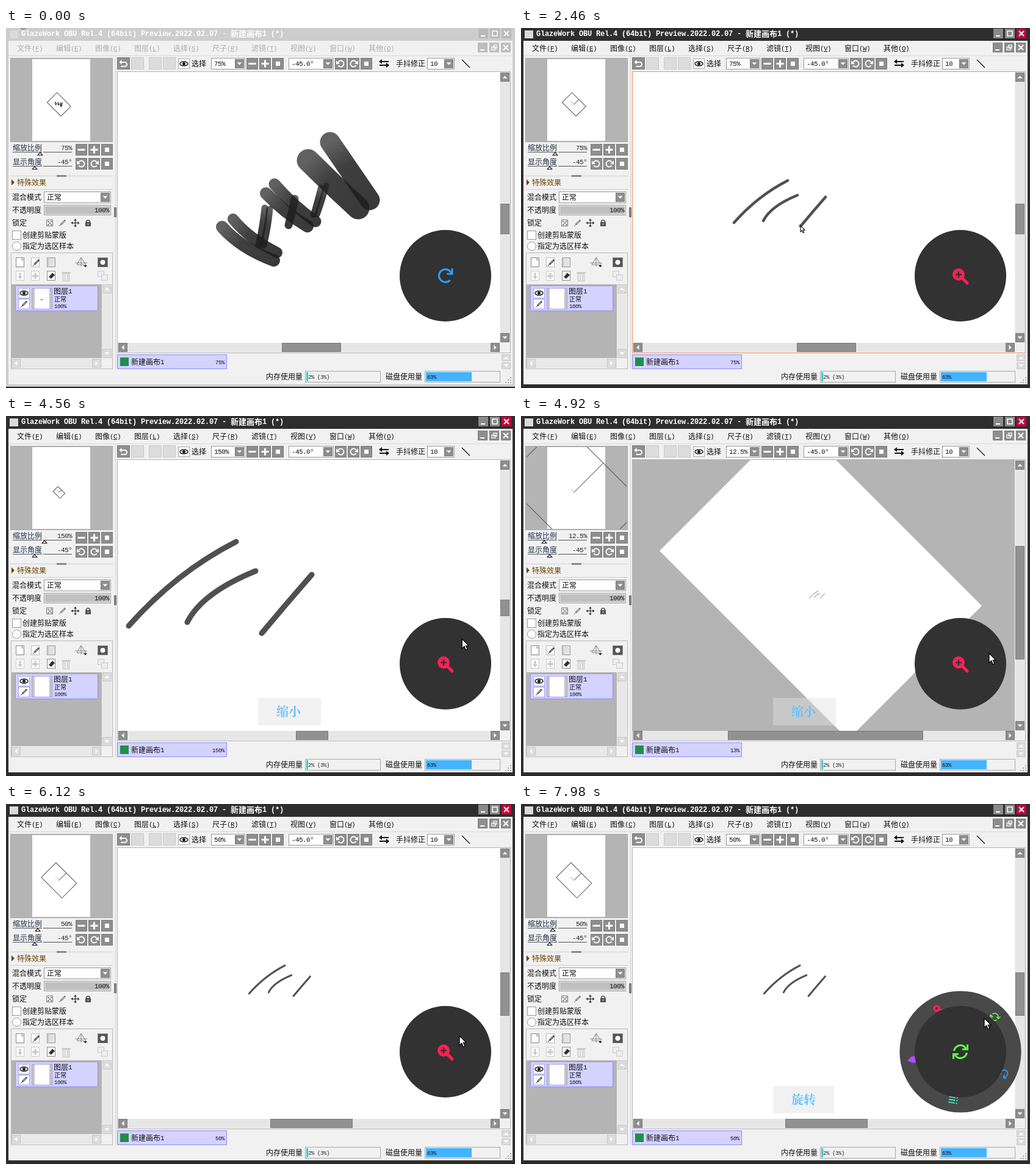
An HTML page with a canvas that plays this animation: 834 by 590 pixels, repeating every 8 s.

```html
<!DOCTYPE html>
<html lang="zh">
<head>
<meta charset="utf-8">
<title>Radial dial demo</title>
<style>
html, body { margin: 0; width: 100%; height: 100%; overflow: hidden; background: #f0f0f0; }
canvas { display: block; width: 834px; height: 590px; }
</style>
</head>
<body>
<canvas id="stage" width="834" height="590"></canvas>
<script>
const g = document.getElementById('stage').getContext('2d');
const LOOP = 8000, RAD = Math.PI / 180;
const VIEW = { x: 497, y: 294, w: 626, h: 444 };
const DIAL = { x: 720, y: 406, r: 75 };
const PINK = '#ff2056', GREEN = '#62ff4d', BLUE = '#2ba0ff';

// Strokes: start, control, end, width (coordinates at 75 % zoom)
const BOLD = [
  [354, 326, 385, 361, 439, 381, 20], [372, 313, 398, 345, 444, 368, 18],
  [424, 295, 421, 325, 414, 356, 11], [432, 297, 429, 328, 422, 356, 11],
  [473, 280, 469, 302, 463, 323, 13],
  [426, 271, 458, 304, 494, 325, 20], [440, 256, 470, 291, 507, 317, 19],
  [516, 262, 510, 285, 504, 306, 10], [525, 258, 518, 284, 510, 306, 9],
  [495, 217, 535, 257, 577, 295, 37], [531, 187, 563, 234, 596, 282, 33]
];
const FINE = [
  [437, 250, 388, 275, 349, 319, 4.5],
  [453, 274, 409, 292, 397, 316, 4.5],
  [499, 277, 478, 301, 458, 325, 4.5]
];
const FINE_TIME = [[1440, 1800], [1920, 2160], [2260, 2450]];
const ZOOM = [[0, 75], [3780, 100], [3960, 150], [4140, 200], [4560, 150], [4620, 100],
  [4680, 75], [4740, 50], [4800, 33.3], [4860, 25], [4920, 12.5],
  [5400, 16.7], [5520, 25], [5600, 33.3], [5690, 50]];
const MOUSE = [[1020, 748, 372], [1400, 437, 249], [1440, 437, 249], [1800, 349, 318],
  [1920, 453, 273], [2160, 397, 315], [2260, 499, 276], [2450, 458, 324], [2600, 458, 324],
  [3000, 746, 364], [4500, 746, 364], [4920, 767, 389], [5340, 743, 384], [5900, 743, 384],
  [6120, 743, 380], [6400, 743, 380], [6780, 762, 400], [7140, 762, 400], [7320, 761, 375],
  [7500, 761, 375], [7680, 759, 351]];
const TOASTS = [[3660, 4560, '放大'], [4560, 5400, '缩小'], [5400, 6110, '放大'], [7860, 8000, '旋转']];

const ramp = (t, a, b) => Math.min(1, Math.max(0, (t - a) / (b - a)));
const ease = p => p * p * (3 - 2 * p);
const mix = (a, b, p) => a + (b - a) * p;

function rect(x, y, w, h, c) { g.fillStyle = c; g.fillRect(x, y, w, h); }
function box(x, y, w, h, fill, edge) {
  rect(x, y, w, h, edge);
  rect(x + 1, y + 1, w - 2, h - 2, fill);
}
function line(c, w, ...p) {
  g.strokeStyle = c; g.lineWidth = w;
  g.beginPath();
  for (let i = 0; i < p.length; i += 2) g.lineTo(p[i], p[i + 1]);
  g.stroke();
}
function poly(c, ...p) {
  g.fillStyle = c;
  g.beginPath();
  for (let i = 0; i < p.length; i += 2) g.lineTo(p[i], p[i + 1]);
  g.closePath();
  g.fill();
}
function disc(x, y, r, c) { g.fillStyle = c; g.beginPath(); g.arc(x, y, r, 0, 7); g.fill(); }
function arc(x, y, r, a, b, c, w) {
  g.strokeStyle = c; g.lineWidth = w;
  g.beginPath(); g.arc(x, y, r, a * RAD, b * RAD); g.stroke();
}
function at(x, y, draw) { g.save(); g.translate(x, y); draw(); g.restore(); }

// Mixed text: CJK and Latin runs have their own size; y is the middle
const STYLES = {
  ui: [12, 11, '-0.6px', ''],
  small: [10, 9, '-0.4px', ''],
  title: [13, 12, '-0.2px', 'bold ']
};
function text(s, x, y, c = '#111', style = 'ui', right = false) {
  const [cjk, latin, gap, weight] = STYLES[style];
  const runs = (s.match(/[\u2e80-\uffff]+|[^\u2e80-\uffff]+/g) || []).map(r => ({
    r, wide: r.charCodeAt(0) > 0x2e7f
  }));
  const set = wide => {
    g.font = weight + (wide ? cjk + 'px "Noto Sans CJK SC","Noto Sans CJK",sans-serif'
      : latin + 'px "Liberation Mono",monospace');
    g.letterSpacing = wide ? '0px' : gap;
  };
  for (const o of runs) { set(o.wide); o.w = g.measureText(o.r).width; }
  if (right) x -= runs.reduce((a, o) => a + o.w, 0);
  g.fillStyle = c;
  for (const o of runs) { set(o.wide); g.fillText(o.r, x, y + (o.wide ? 4.5 : 3.5)); x += o.w; }
  g.letterSpacing = '0px';
}

function spin(flip) {
  g.scale(flip, 1);
  arc(0, 0, 5, -150, 145, '#fff', 1.8);
  poly('#fff', -7.5, -5, -7.5, 1, -1.5, 0);
}
function hook(flip) {
  g.scale(flip, 1);
  line('#fff', 2, -4, -2, 2, -2);
  arc(2, 1.5, 3.5, -90, 90, '#fff', 2);
  line('#fff', 2, 2, 5, -4, 5);
  poly('#fff', -7, -2, -3, -6, -3, 2);
}
const GLYPHS = {
  min: () => rect(-4, 3, 7, 2, '#fff'),
  max: () => { g.strokeStyle = '#fff'; g.lineWidth = 1.5; g.strokeRect(-4, -4, 8, 8); },
  rest: () => { g.strokeStyle = '#fff'; g.lineWidth = 1.2; g.strokeRect(-4, -1, 6, 5); g.strokeRect(-1, -4, 5, 5); },
  shut: () => { line('#fff', 2, -4, -4, 4, 4); line('#fff', 2, -4, 4, 4, -4); },
  minus: () => rect(-6, -1.5, 12, 3, '#fff'),
  plus: () => { rect(-6, -1.5, 12, 3, '#fff'); rect(-1.5, -6, 3, 12, '#fff'); },
  stop: () => rect(-3.5, -3.5, 7, 7, '#fff'),
  ccw: () => spin(1), cw: () => spin(-1),
  undo: () => hook(1), redo: () => hook(-1),
  down: () => poly('#fff', -4, -2, 4, -2, 0, 2),
  up: () => poly('#fff', -4, 2, 4, 2, 0, -2),
  left: () => poly('#fff', 2, -4, 2, 4, -2, 0),
  right: () => poly('#fff', -2, -4, -2, 4, 2, 0),
  none: () => {}
};
function button(x, y, w, glyph, on = true, h = w, fill = '#8e8e8e') {
  box(x, y, w, h, on ? fill : '#dcdcdc', on ? fill === '#8e8e8e' ? '#7b7b7b' : fill : '#c8c8c8');
  at(x + w / 2, y + h / 2, GLYPHS[glyph]);
}
function combo(x, y, w, h, s) {
  box(x, y, w, h, '#fff', '#9a9a9a');
  text(s, x + 5, y + h / 2);
  button(x + w - 17, y + 2, 15, 'down', true, h - 4);
}
function eye(x, y) {
  g.strokeStyle = '#222'; g.lineWidth = 1.5;
  g.beginPath(); g.ellipse(x, y, 6.5, 3.5, 0, 0, 7); g.stroke();
  disc(x, y, 2.6, '#222');
}
function pen(x, y, c = '#333') {
  line(c, 2.6, x - 3, y + 3, x + 4, y - 4);
  line('#fff', 1, x - 2, y + 2, x + 3, y - 3);
  line(c, 1, x - 6, y + 6, x - 3, y + 3);
}

function windowFrame(s) {
  rect(0, 0, 834, 590, '#262626');
  rect(0, 0, 834, 588, s.active ? '#2e2e2e' : '#cdcdcd');
  rect(4, 21, 826, 563, '#f1f1f1');
  rect(6, 4, 14, 13, '#dadada');
  text('GlazeWork OBU Rel.4 (64bit) Preview.2022.02.07 - 新建画布1' + (s.dirty ? ' (*)' : ''),
    25, 9, '#fff', 'title');
  const cap = s.active ? '#8a8a8a' : '#bababa';
  button(774, 1, 16, 'min', true, 16, cap);
  button(793, 1, 16, 'max', true, 16, cap);
  button(812, 1, 16, 'shut', true, 16, s.active ? '#c8003c' : '#bababa');
  ['min', 'rest', 'shut'].forEach((k, i) => button(773 + i * 19, 24, 16, k, true, 16, s.active ? '#8e8e8e' : '#bebebe'));
  const ink = s.active ? '#111' : '#adadad';
  '文件F 编辑E 图像C 图层L 选择S 尺子R 滤镜T 视图V 窗口W 其他O'.split(' ').forEach((m, i) => {
    const x = 18 + i * 64;
    text(`${m.slice(0, 2)}(${m[2]})`, x, 33, ink);
    rect(x + 30, 38, 6, 1, ink);
  });
  rect(4, 45, 826, 1, '#d8d8d8');
}

function toolbar(s) {
  button(182, 48, 21, s.dirty ? 'undo' : 'none', s.dirty, 20);
  button(205, 48, 21, s.redo ? 'redo' : 'none', s.redo, 20);
  button(234, 48, 21, 'none', false, 20);
  button(257, 48, 21, 'none', false, 20);
  box(282, 50, 19, 17, '#fff', '#aaa');
  eye(291.5, 58.5);
  text('选择', 304, 58);
  combo(336, 49, 56, 19, s.zoom + '%');
  ['minus', 'plus', 'stop'].forEach((k, i) => button(394 + i * 21, 49, 19, k));
  combo(463, 49, 74, 19, '-45.0°');
  ['ccw', 'cw', 'stop'].forEach((k, i) => button(539 + i * 21, 49, 19, k));
  rect(615, 54, 12, 2, '#111'); poly('#111', 611, 55, 616, 51, 616, 59);
  rect(612, 60, 12, 2, '#111'); poly('#111', 628, 61, 623, 57, 623, 65);
  text('手抖修正', 639, 58);
  combo(690, 49, 45, 19, '10');
  line('#111', 1.2, 747, 52, 760, 65);
}

function quad([x0, y0, cx, cy, x1, y1, w], p, ink) {
  const ax = mix(x0, cx, p), ay = mix(y0, cy, p);
  g.strokeStyle = ink; g.lineWidth = w;
  g.beginPath();
  g.moveTo(x0, y0);
  g.quadraticCurveTo(ax, ay, mix(ax, mix(cx, x1, p), p), mix(ay, mix(cy, y1, p), p));
  g.stroke();
}
function strokes(s) {
  g.lineCap = 'round';
  BOLD.slice(0, s.bold).forEach(b => {
    const ink = g.createLinearGradient(b[0], b[1], b[4], b[5]);
    ink.addColorStop(0, 'rgba(30,30,30,.7)');
    ink.addColorStop(.4, 'rgba(30,30,30,.85)');
    ink.addColorStop(1, 'rgba(30,30,30,.88)');
    quad(b, 1, ink);
  });
  FINE.forEach((f, i) => s.fine[i] > 0 && quad(f, s.fine[i], '#505050'));
  g.lineCap = 'butt';
}

function clipTo(x, y, w, h) { g.beginPath(); g.rect(x, y, w, h); g.clip(); }

function canvasArea(s) {
  const k = s.zoom / 12.5;
  box(182, 71, 645, 462, '#f1f1f1', s.focus ? '#ff8a5c' : '#b4b4b4');
  g.save();
  clipTo(183, 72, 626, 444);
  rect(183, 72, 626, 444, '#b4b4b4');
  g.translate(VIEW.x, VIEW.y);
  g.save();
  g.scale(k, k);
  poly('#fff', -270, -73, -51, -292, 258, 17, 39, 236);
  g.restore();
  g.scale(k / 6, k / 6);
  g.translate(-VIEW.x, -VIEW.y);
  strokes(s);
  g.restore();

  const bar = (track, view, mid, off) => {
    const total = view + 528 * k, size = track * view / total;
    return [Math.round(mid + off * k / total * track - size / 2), Math.round(size)];
  };
  rect(810, 73, 16, 443, '#e6e6e6');
  rect(184, 516, 625, 15, '#e6e6e6');
  button(810, 73, 15, 'up'); button(810, 500, 15, 'down');
  button(184, 516, 15, 'left'); button(794, 516, 15, 'right');
  const [vy, vh] = bar(408, VIEW.h, 294, 28), [hx, hw] = bar(590, VIEW.w, 495.5, 6);
  box(810, vy, 15, vh, '#919191', '#7b7b7b');
  box(hx, 516, hw, 15, '#919191', '#7b7b7b');
}

function inThumb(s) {
  g.translate(86.8, 125.2);
  g.rotate(45 * RAD);
  g.scale(.051, .051);
  g.translate(-VIEW.x, -VIEW.y);
  strokes(s);
}
function navigator(s) {
  box(7, 49, 168, 138, '#b4b4b4', '#a8a8a8');
  g.save();
  clipTo(9, 51, 164, 134);
  rect(43, 51, 95, 134, '#fff');
  g.save(); inThumb(s); g.restore();
  const k = .306 * 12.5 / s.zoom, w = VIEW.w * k, h = VIEW.h * k;
  g.translate(86.8, 125.2);
  g.rotate(45 * RAD);
  g.strokeStyle = '#555'; g.lineWidth = 1;
  g.strokeRect(-w / 2, -h / 2, w, h);
  if (!s.bold) line('#666', 1, 0, 0, 0, -h / 2);
  g.restore();

  const slider = (y, label, value, x) => {
    text(label, 11, y, '#1c2c44', 'ui');
    text(value, 108, y, '#222', 'ui', true);
    rect(11, y + 7, 97, 1, '#555');
    rect(59, y + 7, 2, 1, '#f1f1f1');
    poly('#222', x - 5, y + 13, x, y + 7, x + 5, y + 13);
    poly('#fff', x - 2.5, y + 12, x, y + 9, x + 2.5, y + 12);
  };
  slider(196, '缩放比例', s.zoom + '%', Math.round(59 + 7 * Math.log2(s.zoom / 100)));
  slider(219, '显示角度', '-45°', 47);
  ['minus', 'plus', 'stop'].forEach((k2, i) => button(114 + i * 21, 190, 19, k2));
  ['ccw', 'cw', 'stop'].forEach((k2, i) => button(114 + i * 21, 213, 19, k2));
}

function properties() {
  rect(7, 242, 168, 1, '#cfcfcf');
  rect(83, 241, 16, 3, '#8a8a8a');
  poly('#6b4300', 9, 248, 14, 253, 9, 258);
  text('特殊效果', 18, 253, '#6b4300');
  rect(7, 264, 168, 1, '#cfcfcf');
  text('混合模式', 10, 277);
  combo(62, 268, 110, 19, '正常');
  text('不透明度', 10, 298);
  box(62, 290, 110, 17, '#f1f1f1', '#9a9a9a');
  rect(64, 292, 106, 13, '#c0c0c0');
  text('100%', 169, 298, '#111', 'ui', true);
  rect(179, 46, 1, 513, '#d4d4d4');
  box(177, 294, 4, 16, '#888', '#6e6e6e');
  text('锁定', 10, 319);
  box(66, 314, 11, 11, '#fff', '#777');
  for (let i = 0; i < 9; i += 2) rect(68 + i % 3 * 2.5, 316 + (i / 3 | 0) * 2.5, 2.5, 2.5, '#888');
  pen(93, 319, '#666');
  line('#333', 1.2, 107, 319.5, 120, 319.5);
  line('#333', 1.2, 113.5, 313, 113.5, 326);
  for (let i = 0; i < 4; i++) at(113.5, 319.5, () => { g.rotate(i * 90 * RAD); poly('#333', -2.5, -4, 2.5, -4, 0, -7); });
  rect(130, 318, 9, 7, '#555');
  arc(134.5, 318, 3, 180, 360, '#555', 1.5);
  rect(134, 320, 1, 3, '#ddd');
  box(10, 332, 15, 15, '#fff', '#999');
  text('创建剪贴蒙版', 27, 339);
  disc(17.5, 357.5, 7, '#fff'); arc(17.5, 357.5, 7, 0, 360, '#999', 1);
  text('指定为选区样本', 27, 357);
}

function layers(s) {
  box(8, 368, 167, 191, '#f1f1f1', '#b8b8b8');
  const page = (x, y, c = '#888') => box(x - 7, y - 8, 14, 16, '#fff', c);
  page(23, 384); poly('#bbb', 25, 376, 30, 381, 25, 381);
  page(48, 384, '#bbb'); pen(50, 384, '#222');
  box(67, 376, 14, 16, '#e2e2e2', '#999'); rect(69, 376, 1, 16, '#bbb');
  line('#888', 1, 123, 376, 116, 388, 131, 388, 123, 376, 123, 391);
  line('#888', 1, 113, 385, 133, 385);
  poly('#111', 127, 389, 133, 389, 130, 392);
  box(150, 376, 17, 16, '#555', '#888'); disc(158.5, 384, 4, '#fff');
  const faint = '#cacaca';
  page(23, 406, faint); line(faint, 3, 23, 401, 23, 408); poly(faint, 19, 407, 27, 407, 23, 412);
  page(48, 406, faint); rect(43, 405, 10, 3, faint); rect(46.5, 401, 3, 10, faint);
  page(74, 406); poly('#333', 70, 408, 76, 401, 80, 405, 74, 411);
  g.strokeStyle = faint; g.lineWidth = 1.5; g.strokeRect(93.5, 402.5, 10, 12);
  rect(91, 400, 15, 2, faint); rect(96, 404, 1.5, 9, faint); rect(100, 404, 1.5, 9, faint);
  box(150, 398, 11, 10, '#eee', faint); box(156, 404, 11, 10, '#eee', faint);

  rect(9, 420, 148, 121, '#b4b4b4');
  rect(158, 420, 15, 121, '#e8e8e8');
  rect(9, 542, 148, 15, '#e8e8e8');
  button(158, 420, 15, 'up', false); button(158, 526, 15, 'down', false);
  button(9, 542, 15, 'left', false); button(141, 542, 15, 'right', false);
  g.beginPath(); g.roundRect(15.5, 422.5, 135, 41, 2);
  g.fillStyle = '#d4d2ff'; g.fill();
  g.strokeStyle = '#8f8cf0'; g.lineWidth = 1; g.stroke();
  box(20, 426, 19, 17, '#fff', '#a5a3e0'); eye(29.5, 434.5);
  box(20, 444, 19, 17, '#fff', '#a5a3e0'); pen(30, 452);
  box(42, 426, 34, 35, '#c4c4c4', '#a5a3e0');
  rect(47, 427, 24, 33, '#fff');
  g.save();
  g.translate(59.5, 443.5); g.scale(.253, .253); g.translate(-91.5, -118);
  inThumb(s);
  g.restore();
  text('图层1', 78, 431);
  text('正常', 79, 443, '#111', 'small');
  text('100%', 79, 455, '#111', 'small');
}

function statusBar(s) {
  box(182, 535, 180, 24, '#d4d2ff', '#8f8cf0');
  rect(187, 540, 14, 14, '#1f8f4c');
  text('新建画布1', 205, 547);
  text(Math.round(s.zoom) + '%', 358, 547, '#111', 'small', true);
  button(812, 535, 15, 'up', false, 11); button(812, 548, 15, 'down', false, 11);
  text('内存使用量', 426, 571);
  box(490, 562, 124, 19, '#f1f1f1', '#a8a8a8');
  rect(492, 564, 3, 15, '#35d0c8');
  text('2% (3%)', 495, 571, '#222', 'small');
  text('磁盘使用量', 622, 571);
  box(686, 562, 124, 19, '#f1f1f1', '#a8a8a8');
  rect(688, 564, 75, 15, '#44b4ff');
  text('63%', 690, 571, '#111', 'small');
  for (let i = 0; i < 3; i++) for (let j = 0; j <= i; j++) rect(826 - j * 4, 572 + i * 4, 2, 2, '#aaa');
}

const ICONS = {
  drop() {
    g.fillStyle = '#b04cff';
    g.beginPath();
    g.moveTo(0, -15);
    g.bezierCurveTo(4, -8, 10, -3, 10, 4);
    g.bezierCurveTo(10, 17, -10, 17, -10, 4);
    g.bezierCurveTo(-10, -3, -4, -8, 0, -15);
    g.fill();
  },
  lens() {
    disc(-3, -2, 10, PINK);
    g.lineCap = 'round';
    line(PINK, 5, 4, 5, 11, 12);
    g.lineCap = 'butt';
    rect(-8, -3.2, 10, 2.6, '#333');
    rect(-4.3, -7, 2.6, 10, '#333');
  },
  sync() {
    for (let i = 0; i < 2; i++) {
      arc(0, 0, 10.5, 188, 328, GREEN, 3);
      line(GREEN, 3, 11.5, -12, 11.5, -4, 3, -4);
      g.rotate(Math.PI);
    }
  },
  turn() {
    arc(0, 0, 10.5, 45, 335, BLUE, 3);
    line(BLUE, 3, 11, -12, 11, -3, 2.5, -3);
  },
  list() {
    for (let y = -8; y <= 8; y += 8) {
      rect(-13, y - 1.5, 4, 3, '#4cf5c8');
      rect(-6, y - 1.5, 19, 3, '#4cf5c8');
    }
  }
};

function dial(s) {
  at(DIAL.x, DIAL.y, () => {
    if (s.ring > .6) {
      g.save();
      g.scale(s.ring, s.ring);
      disc(0, 0, 124.5, '#494949');
      g.rotate(s.turn * RAD);
      ['drop', 'lens', 'sync', 'turn', 'list'].forEach(k => {
        at(0, -100, () => { g.scale(.7, .7); ICONS[k](); });
        g.rotate(72 * RAD);
      });
      g.restore();
    }
    disc(0, 0, DIAL.r, '#323232');
    if (s.pointer) poly('#b4b4b4', 59, -58, 42, -51, 49, -49, 51, -41);
    g.rotate(s.iconTurn * RAD);
    ICONS[s.mode]();
  });
}

function toast(t) {
  const hit = TOASTS.find(([a, b]) => t >= a && t < b);
  if (!hit) return;
  g.globalAlpha = 1 - ramp(t, 5900, 6110) * (t < 7000);
  rect(413, 462, hit[2] === '旋转' ? 100 : 103, 45, 'rgba(224,224,224,.45)');
  g.font = 'bold 20px "Noto Serif CJK SC","Noto Sans CJK SC","Noto Sans CJK",serif';
  g.fillStyle = '#62c0ff';
  g.fillText(hit[2], 443, 492);
  g.globalAlpha = 1;
}

function cursor(t) {
  if (t < MOUSE[0][0]) {
    if (t < 60) arc(28, -4, 6, 0, 180, '#444', 1);
    return;
  }
  let i = MOUSE.findIndex(m => m[0] > t);
  if (i < 0) i = MOUSE.length;
  const a = MOUSE[i - 1], b = MOUSE[i] || a;
  const p = a === b ? 0 : ease(ramp(t, a[0], b[0]));
  const x = mix(a[1], b[1], p), y = mix(a[2], b[2], p);
  const small = Math.hypot(x - DIAL.x, y - DIAL.y) > DIAL.r;
  at(x, y, () => {
    if (small) { arc(0, 0, 2, 0, 360, '#666', 1); g.scale(.65, .65); }
    const path = new Path2D('M0 0V15.5L3.7 12L6.2 18L8.8 17L6.3 11.2H11Z');
    g.lineWidth = small ? 1.6 : 1.2;
    g.fillStyle = '#fff'; g.strokeStyle = '#000';
    g.fill(path); g.stroke(path);
  });
}

function stateAt(t) {
  const gone = t < 60 ? 0 : Math.min(BOLD.length, Math.floor(t / 60));
  const fine = FINE_TIME.map(([a, b]) => ease(ramp(t, a, b)));
  const drawn = t >= 1800;
  const open = 1 - (1 - ramp(t, 6390, 6720)) ** 3;
  return {
    bold: BOLD.length - gone,
    fine,
    dirty: gone < BOLD.length || drawn,
    redo: gone > 0 && !drawn,
    active: t >= 1020,
    focus: t >= 1200 && t < 2760,
    zoom: ZOOM.filter(z => z[0] <= t).pop()[1],
    ring: t < 6390 ? 0 : mix(.6, 1, open) - .2 * ramp(t, 7800, 7980),
    turn: -49.75 * (ease(ramp(t, 7140, 7320)) + ease(ramp(t, 7500, 7680))),
    pointer: t >= 6600 && t < 7840,
    iconTurn: t < 1020 ? -360 * ramp(t, 0, 660) : 0,
    mode: t < 1020 ? 'turn' : t < 7560 ? 'lens' : 'sync'
  };
}

function draw(t) {
  const s = stateAt(t);
  windowFrame(s);
  toolbar(s);
  navigator(s);
  properties();
  layers(s);
  canvasArea(s);
  statusBar(s);
  toast(t);
  dial(s);
  cursor(t);
}

const start = performance.now();
function tick() {
  draw((performance.now() - start) % LOOP);
  requestAnimationFrame(tick);
}
tick();
</script>
</body>
</html>
```
